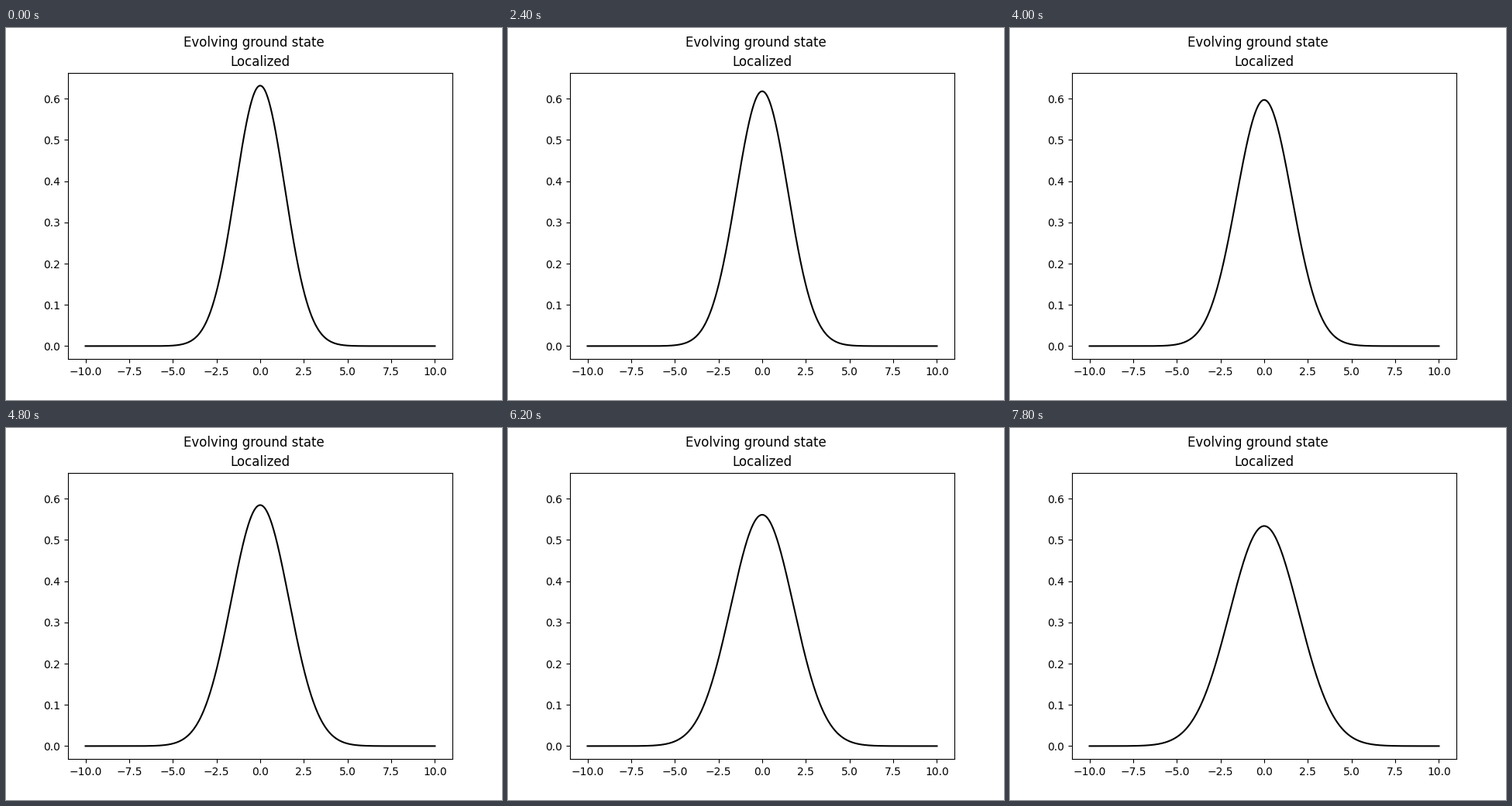
Recreate the animation shown at these times as a matplotlib script. Size 640x480 px, loop 8000 ms.

```python
import numpy as np
import matplotlib.pyplot as plt
from matplotlib.animation import FuncAnimation

FRAMES = 40
INTERVAL = 200  # ms

x = np.linspace(-10, 10, 1000)
times = np.linspace(0, 10, 200)


def packet(t):
    """Modulus of a free Gaussian wave packet of unit initial width."""
    var = 1 + (t / 2) ** 2
    return (2 * np.pi * var) ** -0.25 * np.exp(-x**2 / (4 * var))


fig, ax = plt.subplots(figsize=(6.4, 4.8), dpi=100)
fig.suptitle("Evolving ground state")
ax.set_title("Localized")
line, = ax.plot(x, packet(0), color="black", lw=1.5)

# Keep the limits fitted to the initial, tallest curve.
ax.set_xlim(ax.get_xlim())
ax.set_ylim(ax.get_ylim())


def update(i):
    line.set_ydata(packet(times[i]))
    return line,


anim = FuncAnimation(fig, update, frames=FRAMES, interval=INTERVAL,
                     repeat=True, repeat_delay=0)
plt.show()
```
